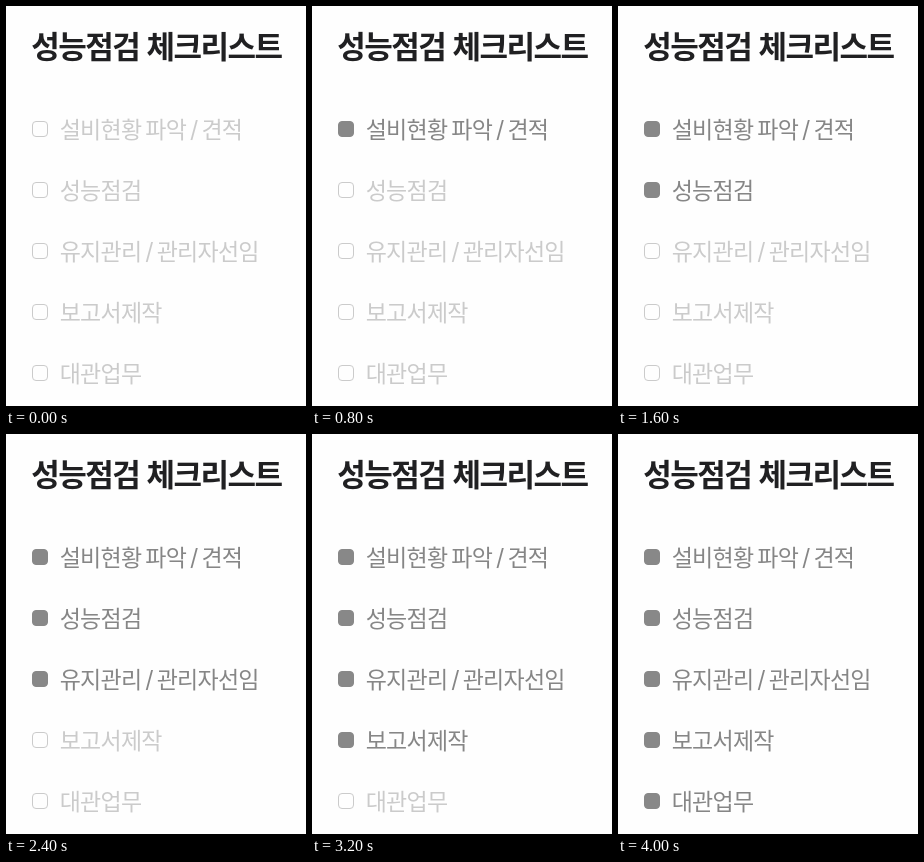
An HTML page that plays this animation: 300 by 400 pixels, repeating every 4800 ms.

```html
<!DOCTYPE html>
<html lang="ko">
<head>
<meta charset="utf-8">
<style>
  html, body { margin: 0; width: 100%; height: 100%; overflow: hidden; background: #fefefe; }
  svg { display: block; width: 300px; height: 400px; }
  text { font-family: "Noto Sans CJK KR", "Noto Sans CJK", "Noto Sans CJK JP", sans-serif; }
  .title { font-size: 31px; font-weight: 700; letter-spacing: -1.5px; fill: #202022; }
  .item text {
    font-family: Inter, "Noto Sans CJK KR", "Noto Sans CJK", "Noto Sans CJK JP", sans-serif;
    font-size: 23px; letter-spacing: -0.75px; word-spacing: -1.8px; fill: #cbcbcb;
  }
  .item rect { fill: #fefefe; stroke: #cbcbcb; stroke-width: 1; }
  .done text { fill: #868686; }
  .done rect { fill: #888; stroke: #888; }
</style>
</head>
<body>
<svg id="stage" viewBox="0 0 300 400">
  <text class="title" x="25.2" y="52">성능점검 체크리스트</text>
</svg>
<script>
  const STEP = 800, ROW = 61;
  const labels = ["설비현황 파악 / 견적", "성능점검", "유지관리 / 관리자선임", "보고서제작", "대관업무"];
  const stage = document.getElementById("stage");

  function add(parent, tag, attrs) {
    const el = document.createElementNS("http://www.w3.org/2000/svg", tag);
    for (const key in attrs) el.setAttribute(key, attrs[key]);
    return parent.appendChild(el);
  }

  const items = labels.map((label, i) => {
    const g = add(stage, "g", { class: "item" });
    const y = i * ROW;
    add(g, "rect", { x: 26.5, y: 115.5 + y, width: 15, height: 15, rx: 3.5 });
    add(g, "text", { x: 53.7, y: 132 + y }).textContent = label;
    return g;
  });

  // One more item is ticked at each step, then the list clears.
  function draw(ms) {
    const ticked = Math.floor(ms / STEP) % (labels.length + 1);
    items.forEach((g, i) => g.classList.toggle("done", i < ticked));
  }

  const start = performance.now();
  function loop() {
    draw(performance.now() - start);
    requestAnimationFrame(loop);
  }
  loop();
</script>
</body>
</html>
```
